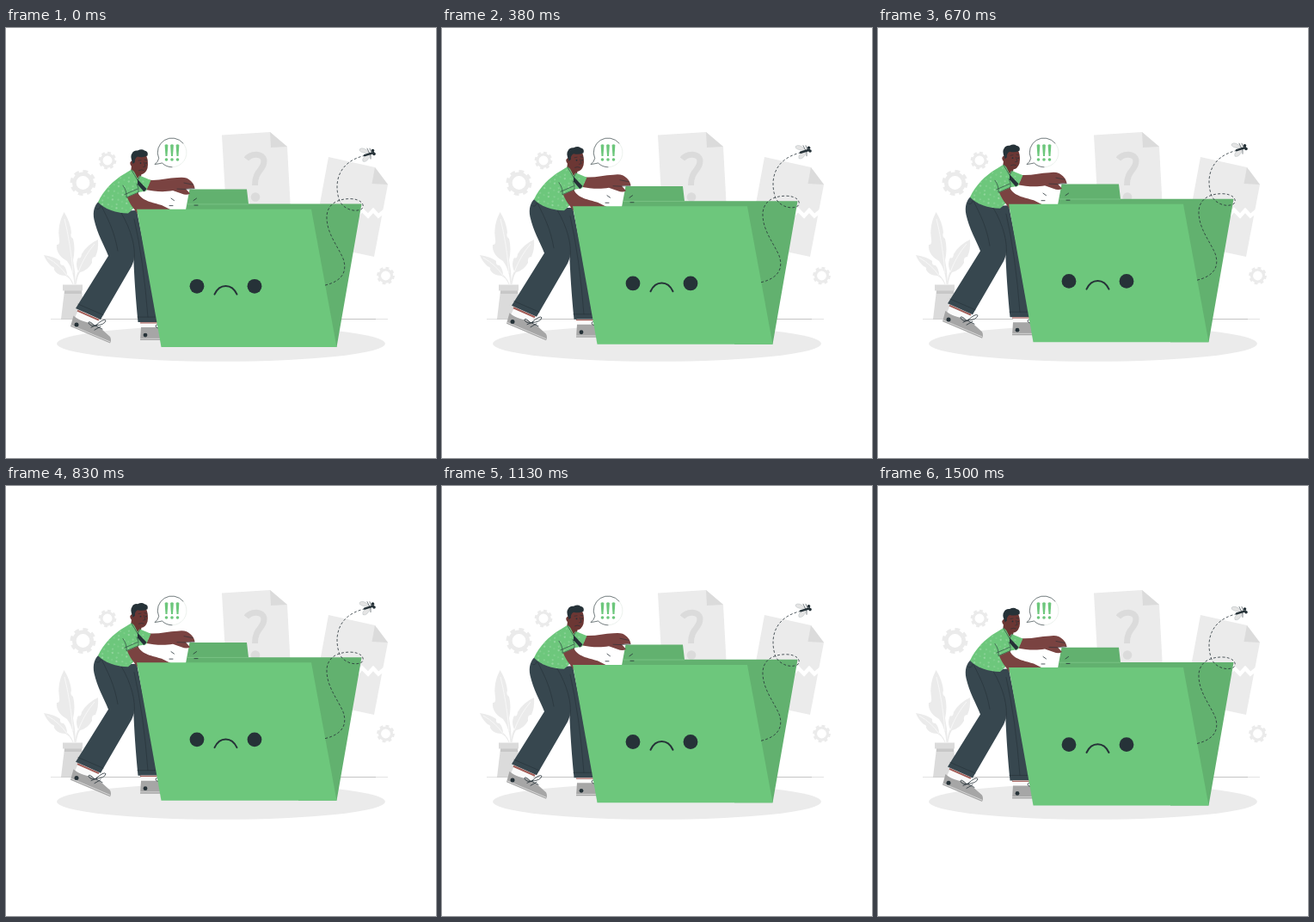
Animation of 500 by 500 pixels, one loop 1.54 s. Source, as an HTML page:

```html
<!DOCTYPE html>
<html lang="en">
<head>
<meta charset="utf-8">
<title>Sad folder</title>
<style>
html, body { margin: 0; width: 100%; height: 100%; overflow: hidden; background: #fff; }
svg { display: block; width: 100vw; height: 100vh; }
.pale { fill: #ebebeb; }
.mid { fill: #dbdbdb; }
.green { fill: #6dc77c; }
.deep { fill: #62b16f; }
.ink { fill: #263238; }
.skin { fill: #7a4341; }
.face { fill: #6c3734; }
.pants { fill: #37474f; }
.shoe { fill: #a6a6a6; }
.line { fill: none; stroke: #263238; stroke-width: .8; stroke-linecap: round; stroke-linejoin: round; }
.fine { stroke-width: .6; }
.vein { fill: none; stroke: #fafafa; stroke-width: .8; }
</style>
</head>
<body>
<svg viewBox="0 0 500 500">
  <defs>
    <g id="gear" fill="none" stroke="#ebebeb">
      <circle r="10.200" stroke-width="4.600"/>
      <circle r="13" stroke-width="4" pathLength="16" stroke-dasharray="1.1 .9"/>
    </g>
    <g id="bang">
      <path d="M-1.9 136Q0 134.600 1.9 136L1 149H-1Z"/>
      <circle cy="153" r="1.8"/>
    </g>
    <path id="shirt" d="M146 164.500L137 170C125 177 113 189 107 202.500C115 211 128 215 142 215.500L148 210L154 191L163 189.500L168.500 177L154 171Z"/>
    <pattern id="specks" width="13" height="11" patternUnits="userSpaceOnUse" patternTransform="rotate(-25)">
      <g fill="#d5f0da">
        <circle cx="2" cy="2" r=".65"/><circle cx="8" cy="5" r=".5"/><circle cx="4" cy="9" r=".6"/><circle cx="11" cy="9" r=".45"/>
      </g>
    </pattern>
  </defs>

  <!-- Backdrop -->
  <ellipse class="pale" cx="250" cy="367" rx="191" ry="20.800"/>
  <path d="M52 338.500H444" stroke="#e3e3e3"/>
  <path d="M64 338.500H430" stroke="#bdbdbd" stroke-width=".8"/>
  <use href="#gear" x="89.500" y="180"/>
  <use href="#gear" transform="translate(118 154) scale(.69)"/>
  <use href="#gear" transform="translate(441.500 288) scale(.69)"/>

  <g class="pale">
    <path d="M79.500 298Q78 280 71 271C62 266 58 259 59 252Q63 252 62 246Q59 230 67.500 214Q75 226 76 238Q74 243 78 245Q81 257 78 270Q81 284 80.800 298Z"/>
    <path d="M80.500 298Q81 288 84 283C81 276 82 271 84 267Q87 269 88 263Q94 252 107 246Q108 257 104 266Q99 266 100 273Q95 282 86 284Q83 289 81.500 298Z"/>
    <path d="M77.500 298Q74 290 69 288C62 288 58 285 56 281Q57 278 53 277Q47 272 44 264Q57 266 63 271Q62 276 67 276Q71 281 71 287Q76 291 78.500 298Z"/>
  </g>
  <path class="vein" d="M78 285Q75 250 68 222M84 284Q91 265 103 251M71 288Q62 275 48 267"/>
  <path class="mid" d="M68 305H88L92 338.500H64Z"/>
  <path d="M68 305H88V309H68Z" fill="#c7c7c7"/>
  <path class="mid" d="M66 298.500H89V305.500H66Z"/>

  <path class="pale" d="M251 124.500L307 121L327 138L331 212H256Z"/>
  <path class="mid" d="M307 121L327 138L308 139Z"/>
  <path d="M279.500 152.500C285 145 300 145 300 155C300 165 289 166 289.500 183" fill="none" stroke="#dbdbdb" stroke-width="7"/>
  <circle class="mid" cx="290" cy="196.500" r="5.300"/>

  <path class="pale" d="M375 150L429 162L444 182L428 266L400 260L365 204Z"/>
  <path d="M407 219L414 211.500L421 218.500L427 212L433 218.500L441 212" fill="none" stroke="#fff" stroke-width="4.500"/>
  <path class="mid" d="M429 162L444 182L425.500 181Z"/>

  <!-- Speech bubble -->
  <path d="M177.700 151.500A16.800 16.800 0 1 1 181.500 157Q177 158 173 158.500Q177 155.500 177.700 151.500Z" fill="#fff" stroke="#e4ebe6" stroke-width=".7"/>
  <path class="line fine" d="M206 134A16.800 16.800 0 0 0 177.700 151.500Q177 155.500 173 158.500Q177 158 181.500 157A16.800 16.800 0 0 0 193 161.800"/>
  <g class="green"><use href="#bang" x="186.500"/><use href="#bang" x="193"/><use href="#bang" x="199.500"/></g>

  <g id="floater">
    <!-- Back of the folder -->
    <path class="deep" d="M209 211.500L213.500 187.300H280L282 204.500H413.500L384.500 371H340V211.500Z"/>
    <path d="M211 204.800H282" stroke="#82c98d" stroke-width=".7"/>

    <!-- Legs -->
    <path class="pants" d="M130 213L152 212L178 342H153.500C151 316 149 290 148 260Z"/>
    <path class="line fine" d="M153 336H176M149 222Q160 270 165 336"/>
    <path d="M157 342H180V349H157Z" fill="#fafafa"/>
    <path d="M156 342.800H180" stroke="#a25b55" stroke-width="1.200"/>
    <path class="shoe" d="M157 348H181V363H156Z"/>
    <path d="M156 361.200H181" stroke="#ddd" stroke-width=".8"/>
    <circle class="ink" cx="162" cy="357" r="2.400"/>
    <path class="line" d="M181 346Q174 343 174 347Q176 350 181 348"/>

    <path d="M84 328L108 338L103 347L80 337Z" fill="#fafafa"/>
    <path d="M83 328.500L108 339.500" stroke="#a25b55" stroke-width="2"/>
    <path class="shoe" d="M78.500 334.500C86 341 93 342 99 343L111 350L121 359Q123 363 121 366.500L75 347Z"/>
    <path d="M75.500 345.500L121 364.800" stroke="#ddd" stroke-width=".9"/>
    <circle class="ink" cx="82" cy="344.800" r="2.500"/>
    <path class="line" d="M103 346Q96 339 96 343Q98 347 104 346Q114 337 116 340Q115 345 104 346L112 350M99 348L106 345M103 351L110 347"/>
    <path class="pants" d="M108 201.500C103 206 100.500 213 102.500 223C106 239 114 252 119 265L81 326L110 339L146 277C153 265 148 234 141 215Q121 213 108 201.500Z"/>
    <path class="line fine" d="M84 321L113 333.500M134 215C146 235 151 256 149 270M111 207C119 223 126 236 130 259M105 210Q109 212 110 207"/>

    <!-- Body -->
    <path class="skin" d="M165 176.500C177 178 188 174 199 174Q206 173 210 174.500C215 177 219 181 219.500 186.500Q214 186 209 187L214 192.500Q210 195 204 192.500L194 189C184 191 172 190 162 188Z"/>
    <path class="line fine" d="M199 187Q208 188 219 186.500M207 180L217 182"/>
    <path class="face" d="M146 160L158 168L156 177L145 168Z"/>
    <use href="#shirt" class="green"/>
    <use href="#shirt" fill="url(#specks)"/>
    <path class="face" d="M147 163L157 169L153 175Z"/>
    <path class="ink" d="M153 176L163.500 187L160.500 190.500L153 182Z"/>
    <path class="line fine" d="M146 165L153 177L156 172M136 183Q141 190 140 197L154 191Q155 186 152 181M138 193.500L153 187"/>
    <path class="skin" d="M141 197L153.500 191.500C157 201 171 203 181 206L192 211.500L153 216C148 209 144 205 141 197Z"/>

    <!-- Head -->
    <path class="face" d="M147 149L163 148Q166 155 164.500 163Q162 171 155 170Q148 168 146 161Q142 156 147 154Z"/>
    <path class="ink" d="M147 156Q144 149 146.500 146Q148 142 153 142.500Q158 140 161 142.500Q166 143.500 164.500 148.500Q159 151 153 149.500Q149 152 150 156L147.500 158Z"/>
    <path class="line fine" d="M154 154L157 153.500M161 153L164 153.500M160.500 156L162 161L159.500 161.500M154.500 165.500Q158 164 160.500 165.500"/>
    <circle class="ink" cx="156.500" cy="157" r=".9"/>
    <circle class="ink" cx="163" cy="157" r=".8"/>
    <path class="line" d="M192 198L195.500 200.500M190 206.500H194M218 200.500L221.500 198M219 206H223"/>

    <!-- Front of the folder -->
    <path class="green" d="M152 210.600H355L384.500 371H180.500Z"/>
    <circle class="ink" cx="222" cy="300.200" r="8.400"/>
    <circle class="ink" cx="289" cy="300.200" r="8.400"/>
    <path class="line" d="M242.500 309.500Q247 299.800 255.500 299.800Q264 299.800 268.500 309.500" style="stroke-width:2"/>

    <!-- Fly and its trail -->
    <path class="line" d="M371 299C392 294 397 282 392 268C386 254 374 240 373 222C372 205 385 198.500 400 198.500C412 198.500 418 205 414 210C407 215 392 211 387.500 200C381 180 386 156 416 148.500" stroke-dasharray="3 2.200" style="stroke-linecap:butt"/>
    <path d="M423 145Q415 137 411 141Q410 145 423 146Q413 150 415 155Q420 157 424 147Z" fill="#e4e4e4" stroke="#a8b0b3" stroke-width=".4"/>
    <path class="line" d="M417 148L427 145" style="stroke-width:2.400"/>
    <path class="line fine" d="M423 146L420 140M424 147L424 152M425 145L423 140"/>
    <circle class="ink" cx="426.500" cy="142.500" r="1.800"/>
    <circle class="ink" cx="428" cy="146.300" r="1.800"/>
  </g>
</svg>
<script>
const LOOP = 1540, LEAD = 45, LOW = 0.5, RISE = 6.8;
const floater = document.getElementById('floater');

// Linear rise and fall
function draw(now) {
  const phase = ((now + LEAD) % LOOP) / LOOP;
  const lift = 1 - Math.abs(1 - 2 * phase);
  floater.setAttribute('transform', `translate(0 ${LOW - RISE * lift})`);
}

let start;
function tick(now) {
  start ??= now;
  draw(now - start);
  requestAnimationFrame(tick);
}
draw(0);
requestAnimationFrame(tick);
</script>
</body>
</html>
```
